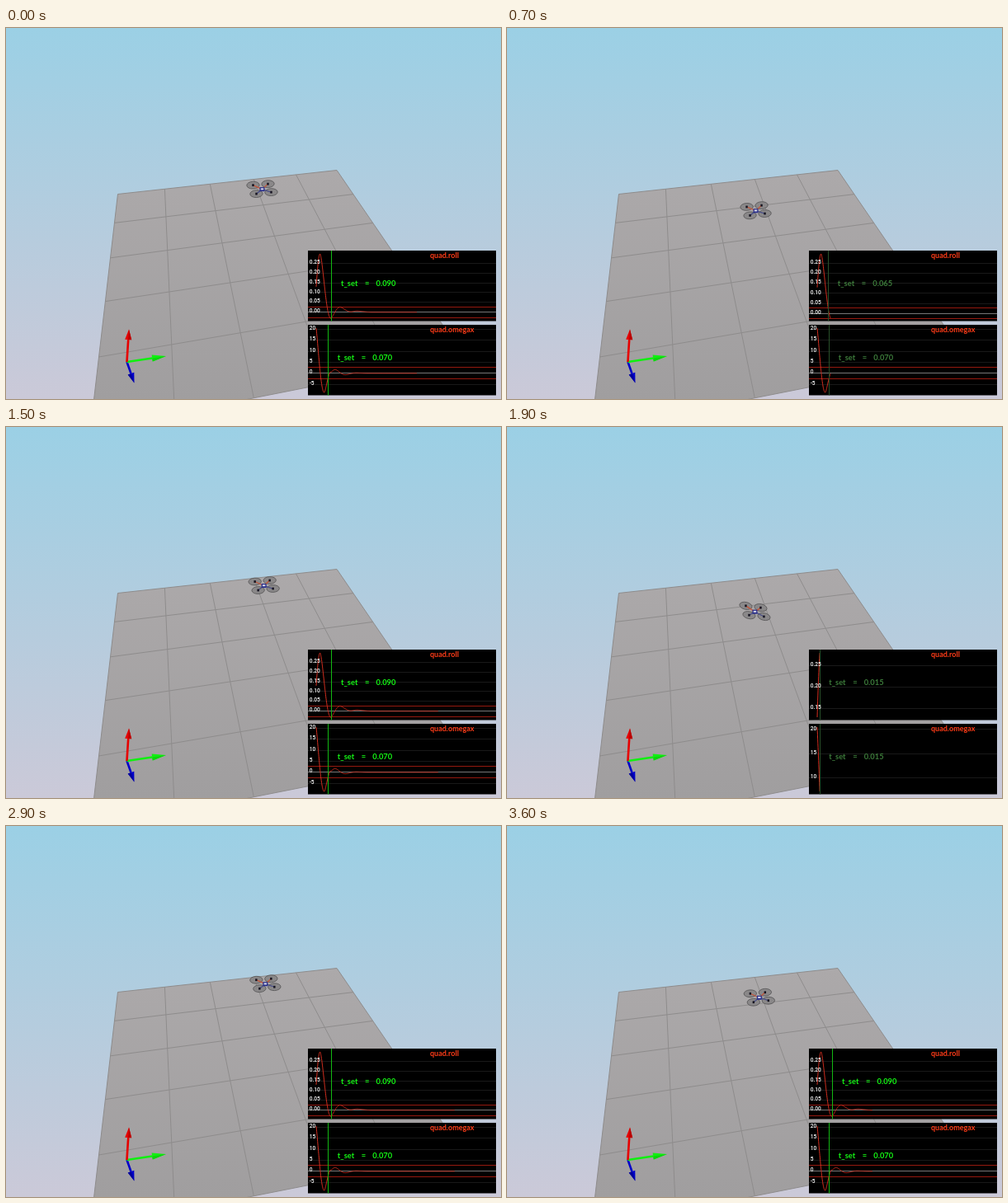
Write an HTML page with a canvas that moves like this. It is 600x450 px and loops after 3.7 s.

```html
<!DOCTYPE html>
<html lang="en">
<head>
<meta charset="utf-8">
<title>Quadrotor step response</title>
<style>
  html, body { margin: 0; width: 100%; height: 100%; overflow: hidden; }
  canvas { display: block; width: 600px; height: 450px; }
</style>
</head>
<body>
<canvas id="stage" width="600" height="450"></canvas>
<script>
const ctx = document.getElementById('stage').getContext('2d');
const LOOP = 3700, STEP = 100, SIM_STEP = 0.078, SAMPLE = 0.001;

// Flights: first step of the loop, simulated time at that step
const FLIGHTS = [[0, 0.578], [7, 0.076], [19, 0.015], [32, 0.005]];

// Turning points (time, value) of the two damped responses
const ROLL = {
  title: 'quad.roll', top: 270, band: 0.0275, start: 0.12992,
  turns: [[-0.0134, 0], [0.022, 0.298], [0.083, -0.031], [0.137, 0.026],
    [0.2, 0.002], [0.235, 0.006], [0.32, 0]]
};
const OMEGA = {
  title: 'quad.omegax', top: 360, band: 2.6, start: 20.4993,
  turns: [[-0.01, 25.6], [0.046, -8.7], [0.085, 0.6], [0.109, 1.7],
    [0.168, -0.7], [0.23, 0.15], [0.3, 0]]
};

// Skewed cosine swing from one turning point to the next
function swing(turns, t) {
  const i = turns.findIndex(p => p[0] > t);
  if (i < 0) return 0;
  const [t0, v0] = turns[i - 1], [t1, v1] = turns[i];
  const s = ((t - t0) / (t1 - t0)) ** 0.8;
  return v0 + (v1 - v0) * (0.5 - 0.5 * Math.cos(Math.PI * s));
}

function line(x0, y0, x1, y1, color, width = 1) {
  ctx.strokeStyle = color;
  ctx.lineWidth = width;
  ctx.beginPath();
  ctx.moveTo(x0, y0);
  ctx.lineTo(x1, y1);
  ctx.stroke();
}

function poly(pts, fill) {
  ctx.fillStyle = fill;
  ctx.beginPath();
  pts.forEach(p => ctx.lineTo(p[0], p[1]));
  ctx.closePath();
  ctx.fill();
}

function text(str, x, y, color, font) {
  ctx.font = font;
  ctx.fillStyle = color;
  ctx.fillText(str, x, y);
}

function gradient(y0, y1, from, to) {
  const g = ctx.createLinearGradient(0, y0, 0, y1);
  g.addColorStop(0, from);
  g.addColorStop(1, to);
  return g;
}

// Perspective map from the unit square to four corners
function projector([a, b, c, d]) {
  const sx = a[0] - b[0] + c[0] - d[0], sy = a[1] - b[1] + c[1] - d[1];
  const dx1 = b[0] - c[0], dx2 = d[0] - c[0], dy1 = b[1] - c[1], dy2 = d[1] - c[1];
  const det = dx1 * dy2 - dx2 * dy1;
  const g = (sx * dy2 - dx2 * sy) / det, h = (dx1 * sy - sx * dy1) / det;
  return (u, v) => {
    const w = 1 + g * u + h * v;
    return [0, 1].map(k => (a[k] + (b[k] - a[k] + g * b[k]) * u +
      (d[k] - a[k] + h * d[k]) * v) / w);
  };
}

const FLOOR = [[135.5, 201.5], [401, 172.5], [555.3, 398.3], [102.2, 488]];
const onFloor = projector(FLOOR);

function drawScene() {
  ctx.fillStyle = gradient(0, 450, '#9bd0e5', '#cbc9d8');
  ctx.fillRect(0, 0, 600, 450);
  poly(FLOOR, gradient(172, 450, '#aca9aa', '#a09e9f'));
  for (let i = 0; i <= 5; i++) {
    const k = i / 5;
    line(...onFloor(0, k), ...onFloor(1, k), '#8e8c8c');
    line(...onFloor(k, 0), ...onFloor(k, 1), '#8e8c8c');
  }
}

function arrow(dx, dy, head, color, shade) {
  const len = Math.hypot(dx, dy), ux = dx / len, uy = dy / len;
  const at = (along, side) =>
    [146.5 + ux * along - uy * side, 405 + uy * along + ux * side];
  const neck = at(len - head, 0), tip = at(len, 0);
  line(...at(0, 0), ...neck, color, 2.6);
  poly([tip, at(len - head, 4), at(len - head, -4)], color);
  poly([tip, neck, at(len - head, 4)], shade);
}

function drawAxes() {
  arrow(9, 25.5, 12, '#0000c8', '#000098');
  arrow(47.5, -7, 17, '#10f010', '#0cd60c');
  arrow(2.5, -39.5, 12.5, '#e60000', '#b80000');
}

function drawDrone(t) {
  const rise = Math.sin(Math.PI / 2 * Math.min(t / 0.8, 1)) ** 1.3;
  const x = 300.2 + 17.8 * Math.min(t, 0.85), y = 224.5 - 32.8 * rise;
  const roll = swing(ROLL.turns, t);
  const rotors = [[-11, -5], [7, -6.5], [-7, 5.5], [11, 3.5]]
    .map(([dx, dy]) => [x + dx, y + dy + dx * roll * 0.75]);
  rotors.forEach(([rx, ry]) => {
    ctx.beginPath();
    ctx.ellipse(rx, ry, 7.7, 4.4, roll * 0.9 - 0.04, 0, 7);
    ctx.fillStyle = '#8a8889';
    ctx.fill();
    ctx.strokeStyle = '#545253';
    ctx.lineWidth = 0.8;
    ctx.stroke();
  });
  rotors.forEach(([rx, ry], i) => {
    line(x, y, rx, ry, i < 2 ? '#c4553a' : '#4a4f86', 1.3);
    ctx.fillStyle = '#161420';
    ctx.fillRect(rx - 1.2, ry - 1.4, 2.4, 2.8);
  });
  ctx.fillStyle = '#2a2f8a';
  ctx.fillRect(x - 3, y - 2.5, 6, 5);
  ctx.fillStyle = '#d4d4e6';
  ctx.fillRect(x - 1.7, y - 1.3, 3.4, 2);
}

const timeX = t => 376 + 211 * t;
const snap = v => Math.floor(v) + 0.5;

function drawPlot({ title, top, band, start, turns }, t) {
  let lo = Infinity, hi = -Infinity, settle = 0;
  const trace = [];
  for (let s = 0; s <= t + 1e-9; s += SAMPLE) {
    const v = swing(turns, s);
    trace.push([timeX(s), v]);
    lo = Math.min(lo, v);
    hi = Math.max(hi, v);
    if (Math.abs(v) > band) settle = s;
  }
  settle = Math.ceil(settle / 0.005 - 1e-6) * 0.005;
  const single = t < 0.01;
  if (single) {
    lo = start - 0.0005;
    hi = start + 0.0005;
  }
  const toY = v => top + 82 - (v - lo) / (hi - lo) * 78;
  const across = (v, color) => line(366, snap(toY(v)), 594, snap(toY(v)), color);

  ctx.save();
  ctx.beginPath();
  ctx.rect(366, top, 228, 85.5);
  ctx.clip();
  ctx.fillStyle = '#000';
  ctx.fillRect(366, top, 228, 86);

  const step = 0.5 * 10 ** Math.floor(Math.log10(hi - lo) + 1e-6);
  const digits = Math.max(0, -Math.floor(Math.log10(step) + 1e-6));
  const first = Math.ceil(lo / step), last = Math.floor(hi / step);
  for (let k = first; k <= last; k++) across(k * step, k ? '#191919' : '#777');
  across(band, '#96190f');
  across(-band, '#96190f');

  if (!single) {
    ctx.strokeStyle = '#d83020';
    ctx.lineWidth = 1;
    ctx.beginPath();
    trace.forEach(([x, v]) => ctx.lineTo(x, toY(v)));
    ctx.stroke();
  }

  const settled = t - settle > 0.05, x = timeX(settle);
  line(snap(x), top, snap(x), top + 86, settled ? '#12b812' : '#28502a');
  const green = settled ? '#14f414' : '#3c7a3a';
  ['t_set', '=', settle.toFixed(3)].forEach((part, i) =>
    text(part, x + 11 + [0, 29, 42.5][i], top + 43, green,
      'bold 9.4px Lato, sans-serif'));

  for (let k = first; k <= last; k++) {
    text((k * step).toFixed(digits), 367.7, toY(k * step) + 0.6, '#fff',
      '500 6.6px Roboto, sans-serif');
  }
  text(title, 514, top + 8.7, '#ff3c18', 'bold 9px Lato, sans-serif');
  ctx.restore();
}

function render(ms) {
  const n = Math.floor(ms % LOOP / STEP);
  const [start, t0] = FLIGHTS.filter(f => f[0] <= n).pop();
  const t = t0 + (n - start) * SIM_STEP;
  drawScene();
  drawAxes();
  drawDrone(t);
  drawPlot(ROLL, t);
  drawPlot(OMEGA, t);
}

const begin = performance.now();
function tick() {
  render(performance.now() - begin);
  requestAnimationFrame(tick);
}
tick();
</script>
</body>
</html>
```
